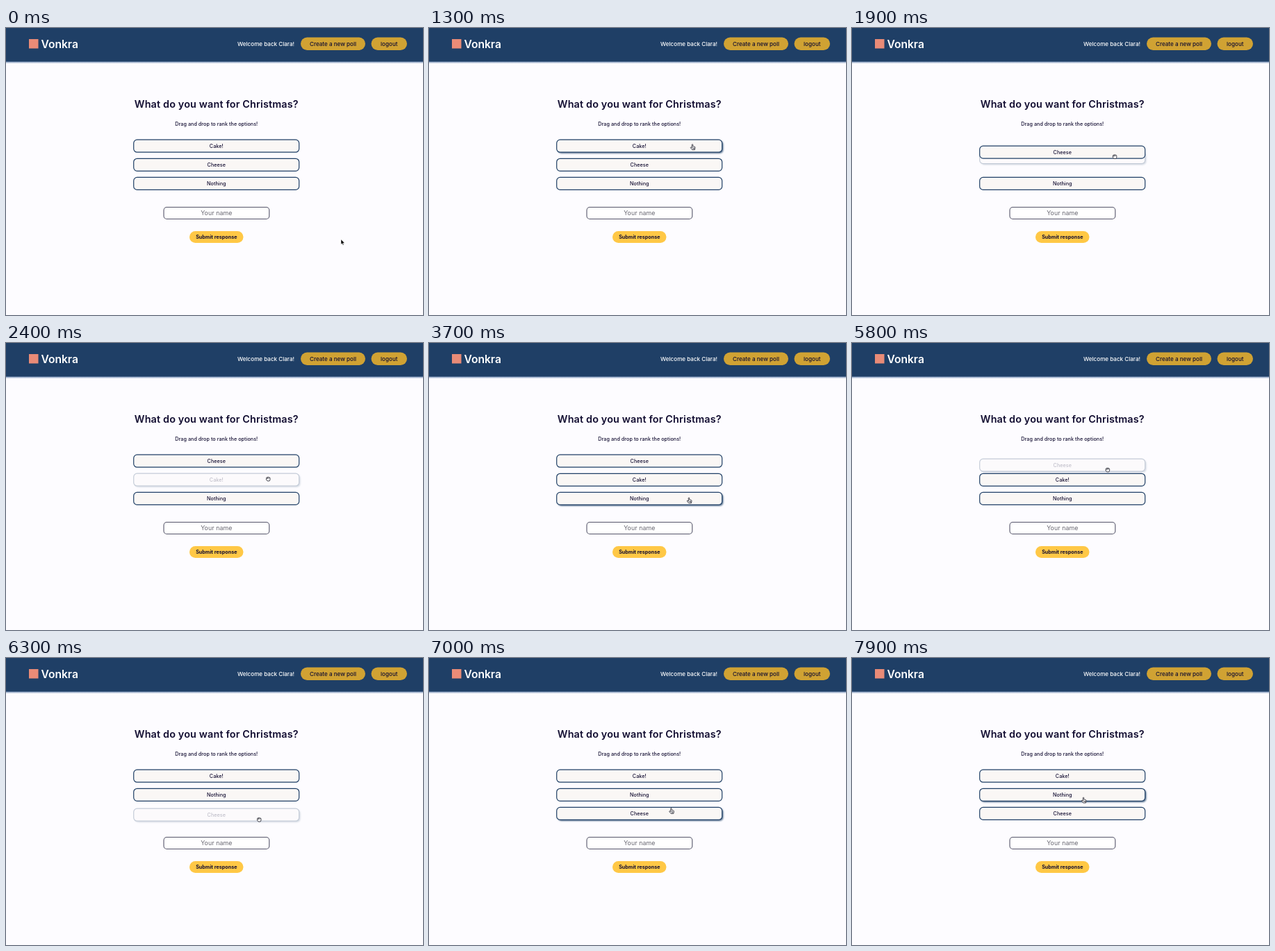
Recreate the animation shown at these times as an HTML page. Size 600 by 414 pixels, loop 8000 ms.

```html
<!DOCTYPE html>
<html lang="en">
<head>
<meta charset="utf-8">
<title>Poll ranking</title>
<style>
  html, body { margin: 0; width: 100%; height: 100%; overflow: hidden; background: #fdfcff; }
  svg { display: block; width: 600px; height: 414px; font-family: Inter, "Open Sans", sans-serif; }
  text { fill: #120d31; font-weight: 500; text-anchor: middle; }
  .brand { font-size: 15.6px; font-weight: 600; fill: #fff; text-anchor: start; }
  .nav { font-size: 8.1px; }
  .hello { fill: #fff; text-anchor: end; }
  .title { font-size: 14.4px; font-weight: 600; letter-spacing: .15px; }
  .small { font-size: 7.2px; letter-spacing: .05px; }
  .hint { font-size: 8.8px; font-weight: 400; fill: #66656f; letter-spacing: .08px; }
  .send { font-size: 7.2px; font-weight: 700; }
  .box { fill: #faf7f5; stroke: #1f3f66; stroke-width: 1.2; }
  .cursor path { stroke-linejoin: round; stroke-linecap: round; }
  .hand path { fill: #fff; stroke: #1b1b26; stroke-width: .8; }
</style>
</head>
<body>
<svg viewBox="0 0 600 414">
  <defs>
    <linearGradient id="edge" x2="0" y2="1">
      <stop stop-color="#6f8bb2"/>
      <stop offset="1" stop-color="#fdfcff"/>
    </linearGradient>
    <filter id="soft" x="-5%" y="-40%" width="110%" height="180%">
      <feGaussianBlur stdDeviation=".8"/>
    </filter>
  </defs>
  <rect width="600" height="414" fill="#fdfcff"/>
  <rect y="48" width="600" height="3.6" fill="url(#edge)"/>
  <rect width="600" height="48.5" fill="#1f3f66"/>
  <rect x="33" y="16" width="13.5" height="13.5" fill="#e98b77"/>
  <text class="brand" x="50.5" y="28.6">Vonkra</text>
  <text class="nav hello" x="415" y="26">Welcome back Clara!</text>
  <rect x="424" y="13.5" width="93" height="18.5" rx="9.25" fill="#d0a233"/>
  <text class="nav" x="470.5" y="25.7">Create a new poll</text>
  <rect x="525.5" y="13.5" width="51.5" height="18.5" rx="9.25" fill="#d0a233"/>
  <text class="nav" x="551.3" y="25.7">logout</text>

  <text class="title" x="302.8" y="114.8">What do you want for Christmas?</text>
  <text class="small" x="302.8" y="141">Drag and drop to rank the options!</text>
  <g id="list"></g>
  <rect x="227" y="258.5" width="151.8" height="17" rx="4.5" fill="#fff" stroke="#55556a" stroke-width="1.1"/>
  <text class="hint" x="302.8" y="270">Your name</text>
  <rect x="264" y="293" width="77.5" height="17" rx="8.5" fill="#ffc846"/>
  <text class="send" x="302.8" y="303.9">Submit response</text>

  <g id="cursor" class="cursor">
    <g id="arrow">
      <path d="M0 0V7.2L1.7 5.7L2.8 8.2L4 7.7L2.9 5.3H5.2Z" fill="#000" stroke="#fff" stroke-width=".5"/>
    </g>
    <g id="point" class="hand">
      <path d="M-.8 .7C-.8-.3 .7-.3 .7 .7V3L3.1 3.5Q4.1 3.8 4 4.9L3.4 8H-.3L-2.7 5Q-2.6 3.8-1.6 4.4L-.8 5Z"/>
      <path d="M1 5.2V6.6M2.4 5.2V6.6" stroke-width=".5"/>
    </g>
    <g id="grab" class="hand">
      <path d="M-2.2-.6Q-1.6-2-.5-1.4Q.6-2.1 1.4-1.2Q2.9-1.5 3 .2V2L2.1 4H-1L-2.6 1.9Q-3 .9-2 .7Z"/>
      <path d="M-1.9 .7V-.2M-.4 .3V-.6M1.1 .3V-.6" stroke-width=".5"/>
    </g>
  </g>
</svg>
<script>
const LOOP = 8000, TOP = 170.2, PITCH = 27.1;
const $ = id => document.getElementById(id);
const clamp = v => Math.min(1, Math.max(0, v));
const smooth = v => v * v * (3 - 2 * v);
const easeOut = v => 1 - (1 - v) ** 3;

// Pointer hotspot: time, x, y
const path = [
  [0, 482, 305], [1000, 379, 167], [1500, 379, 168], [2200, 377, 195],
  [2550, 377, 195], [3300, 374, 223], [4600, 374, 223], [4700, 372, 216],
  [5100, 369, 199], [5250, 369, 199], [5300, 369, 198], [5400, 369, 198],
  [5650, 368, 176], [5700, 368, 176], [6200, 364, 232], [6600, 364, 232],
  [7400, 333, 201], [8000, 333, 201]
];

// drag: start, end, row left, row reached; moves: start, row left, row reached
const items = [
  { name: "Cake!", row: 0, drags: [[1500, 2550, 0, 1]], moves: [[5870, 1, 0]] },
  { name: "Cheese", row: 1, drags: [[5700, 6600, 0, 2]], moves: [[1830, 1, 0]] },
  { name: "Nothing", row: 2, drags: [], moves: [[6020, 2, 1]] }
];

for (const item of items) {
  const g = document.createElementNS("http://www.w3.org/2000/svg", "g");
  g.innerHTML = `<rect x="185.3" y="-7.4" width="238" height="18" rx="5" fill="#1f3f66" filter="url(#soft)"/>
    <rect class="box" x="183.7" y="-9" width="238" height="18" rx="5"/>
    <text class="small" x="302.8" y="2.5">${item.name}</text>`;
  $("list").append(g);
  item.node = g;
  item.shadow = g.firstElementChild;
}

function pointer(t) {
  const i = Math.max(1, path.findIndex(p => p[0] >= t));
  const [t0, x0, y0] = path[i - 1], [t1, x1, y1] = path[i];
  const k = smooth(clamp((t - t0) / (t1 - t0)));
  return { x: x0 + (x1 - x0) * k, y: y0 + (y1 - y0) * k };
}

const dragAt = (item, t) => item.drags.find(d => t >= d[0] && t < d[1]);

function itemY(item, t) {
  const rowY = r => TOP + r * PITCH;
  const drag = dragAt(item, t);
  if (drag) return rowY(drag[2]) + pointer(t).y - pointer(drag[0]).y;
  let y = rowY(item.row), last = -1;
  for (const [start, from, to] of item.moves) {
    if (t < start) continue;
    y = rowY(from) + (rowY(to) - rowY(from)) * easeOut(clamp((t - start) / 230));
    last = start;
  }
  for (const [start, end, from, to] of item.drags) {
    if (t < end || end < last) continue;
    const drop = rowY(from) + pointer(end).y - pointer(start).y;
    y = drop + (rowY(to) - drop) * easeOut(clamp((t - end) / 200));
  }
  return y;
}

function hovered(item, t) {
  if (dragAt(item, t)) return true;
  if (items.some(other => dragAt(other, t))) return false;
  const p = pointer(t);
  return p.x > 183 && p.x < 423 && Math.abs(p.y - itemY(item, t)) < 9.6;
}

// Share of the last moments spent hovering gives a short fade
function glow(item, t) {
  let sum = 0;
  for (let i = 0; i < 8; i++) sum += hovered(item, Math.max(0, t - i * 15));
  return sum / 8;
}

function draw(t) {
  for (const item of items) {
    item.node.setAttribute("transform", `translate(0 ${itemY(item, t).toFixed(2)})`);
    item.node.setAttribute("opacity", dragAt(item, t) ? .25 : 1);
    item.shadow.setAttribute("opacity", .8 * glow(item, t));
  }
  const p = pointer(t);
  const kind = items.some(i => dragAt(i, t)) ? "grab" : items.some(i => hovered(i, t)) ? "point" : "arrow";
  for (const id of ["arrow", "point", "grab"]) $(id).setAttribute("display", id === kind ? "inline" : "none");
  $("cursor").setAttribute("transform", `translate(${p.x.toFixed(2)} ${p.y.toFixed(2)})`);
}

const begin = performance.now();
function tick() {
  draw((performance.now() - begin) % LOOP);
  requestAnimationFrame(tick);
}
tick();
</script>
</body>
</html>
```
